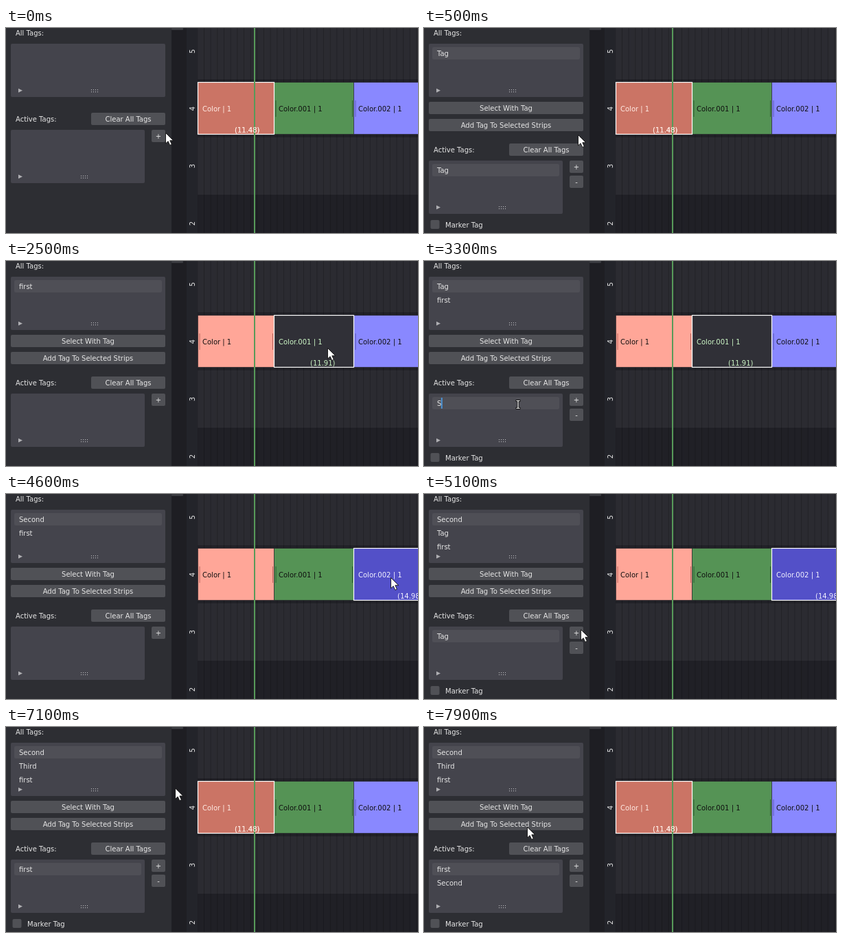
An HTML page that plays this animation: 600x300 px, repeating every 8000 ms.

```html
<!DOCTYPE html>
<html lang="en">
<head>
<meta charset="utf-8">
<title>Strip tags</title>
<style>
  html, body { margin: 0; width: 100%; height: 100%; overflow: hidden; background: #2d2e33; }
  svg { display: block; width: 600px; height: 300px; }
  text { font: 10px "DejaVu Sans", sans-serif; fill: #e6e6e6; white-space: pre; }
  .mid { text-anchor: middle; }
  .list { fill: #44444c; }
  .row { fill: #4f4f56; }
  .button { fill: #505156; }
  .hot { fill: #5d5e63; }
  .grip, .fold { fill: #c9c9cc; }
  .fold { opacity: .8; }
</style>
</head>
<body>
<svg viewBox="0 0 600 300">
  <defs>
    <pattern id="grid" x="288" width="9.67" height="300" patternUnits="userSpaceOnUse">
      <path d="M.5 0V300" stroke="#000" stroke-opacity=".22"/>
    </pattern>
  </defs>
  <rect width="600" height="300" fill="#2d2e33"/>
  <rect x="241" width="22" height="300" fill="#1e1e23"/>
  <rect x="241" width="17" height="3" rx="1" fill="#3a3b40"/>
  <rect x="263" width="337" height="300" fill="#2b2b31"/>
  <rect x="263" y="75" width="337" height="85" fill="#212127"/>
  <rect x="263" y="244" width="337" height="56" fill="#202026"/>
  <rect x="279" width="321" height="300" fill="url(#grid)"/>
  <rect x="263" width="16" height="300" fill="#23242a"/>
  <g id="channels"></g>
  <g id="strips"></g>
  <g id="panel"></g>
  <g id="arrow">
    <path d="M.5 .5V16l3.6-3.3 2.6 5.8 2.7-1.2-2.6-5.6h4.9z" fill="#fff" stroke="#111" stroke-width=".9"/>
  </g>
  <g id="beam" fill="none" stroke-linecap="square">
    <path d="M-2-5.5h4M0-5.5v11M-2 5.5h4" stroke="#111" stroke-width="3"/>
    <path d="M-2-5.5h4M0-5.5v11M-2 5.5h4" stroke="#fff" stroke-width="1.2"/>
  </g>
</svg>
<script>
const LOOP = 8000, STEP = 100;
const $ = id => document.getElementById(id);

const strips = [
  { x: 279.5, w: 111, name: "Color | 1", nameX: 286, time: "(11.48)", timeX: 333,
    fill: "#ffa698", on: "#cb7465", ink: "#ffeae3", edge: "#b8645c" },
  { x: 390.5, w: 116, name: "Color.001 | 1", nameX: 397, time: "(11.91)", timeX: 443,
    fill: "#559355", on: "#303037", ink: "#cdf7c6", edge: "#2f5c33" },
  { x: 506.5, w: 120, name: "Color.002 | 1", nameX: 513, time: "(14.98)", timeX: 570,
    fill: "#8988ff", on: "#5350c8", ink: "#f3f2ff", edge: "#5c5ab5" }
];

// Each entry changes part of the state from its time on.
const events = [
  [0, { all: [], active: [], sel: 0, edit: null, marked: false, hot: "" }],
  [400, { hot: "+" }],
  [500, { all: ["Tag"], active: ["Tag"], hot: "" }],
  [1200, { edit: "Tag", marked: true }],
  ...typed("first", 1300),
  [1900, { edit: null, all: ["first"], active: ["first"] }],
  [2500, { sel: 1, active: [] }],
  [2900, { hot: "+" }],
  [3000, { all: ["Tag", "first"], active: ["Tag"], hot: "" }],
  [3200, { edit: "Tag", marked: true }],
  [3300, { edit: "S", marked: false }],
  [3800, { edit: "Sec" }],
  [3900, { edit: "Secon" }],
  [4100, { edit: "Second" }],
  [4200, { edit: null, all: ["Second", "first"], active: ["Second"] }],
  [4600, { sel: 2, active: [] }],
  [5000, { all: ["Second", "Tag", "first"], active: ["Tag"] }],
  [5700, { edit: "Tag", marked: true }],
  [5800, { edit: "T", marked: false }],
  [5900, { edit: "Th" }],
  [6100, { edit: "Third" }],
  [6300, { edit: null, all: ["Second", "Third", "first"], active: ["Third"] }],
  [6800, { sel: 0, active: ["first"] }],
  [7800, { hot: "add" }],
  [7900, { active: ["first", "Second"], hot: "" }]
];

// Pointer stops: time, x, y
const path = [
  [0, 232, 153], [200, 232, 153], [300, 224, 156], [500, 224, 156], [1000, 76, 203],
  [1900, 76, 203], [2300, 468, 127], [2500, 468, 127], [2900, 223, 199], [3000, 223, 199],
  [3200, 137, 210], [4200, 137, 210], [4600, 560, 122], [4900, 228, 198], [5100, 228, 198],
  [5500, 110, 208], [6300, 110, 208], [6500, 267, 177], [6800, 320, 116], [6900, 320, 116],
  [7400, 110, 40], [7600, 110, 40], [7800, 150, 146], [8000, 150, 146]
];
const beamTimes = [[900, 1900], [3200, 4200], [5500, 6300]];

function typed(word, start) {
  return [...word].map((c, i) => [start + i * STEP, { edit: word.slice(0, i + 1), marked: false }]);
}

// y is the middle of the line
const label = (s, x, y, attrs = "") => `<text x="${x}" y="${y + 3.8}" ${attrs}>${s}</text>`;
const box = (x, y, w, h, cls) => `<rect x="${x}" y="${y}" width="${w}" height="${h}" rx="2" class="${cls}"/>`;
const button = (s, x, y, w, hot) =>
  box(x, y, w, 18, hot ? "hot" : "button") + label(s, x + w / 2, y + 9.2, 'class="mid"');

function list(y, w, items) {
  let out = box(7, y, w, 78, "list");
  if (items.length) out += box(12, y + 5, w - 10, 18, "row");
  items.forEach((s, i) => out += label(s, 19, y + 14 + i * 20));
  out += `<path class="fold" d="M18 ${y + 65.5}l6 3-6 3z"/>`;
  const mid = 7 + Math.round(w / 2);
  for (let i = 0; i < 8; i++)
    out += `<rect class="grip" x="${mid + 4 + (i % 4) * 3}" y="${y + 67 + (i >> 2) * 3}" width="1" height="1"/>`;
  return out;
}

const ruler = document.createElement("canvas").getContext("2d");
ruler.font = '10px "DejaVu Sans", sans-serif';

function field(s, marked, y) {
  const w = ruler.measureText(s).width;
  return box(12, y + 5, 185, 18, "row") +
    (marked ? `<rect x="19" y="${y + 6}" width="${w}" height="16" fill="#2e3036"/>` : "") +
    label(s, 19, y + 14) +
    `<rect x="${18.5 + w}" y="${y + 6}" width="2" height="16" fill="#4a91d2"/>`;
}

function panel(s) {
  const dy = s.all.length ? 45 : 0, y = 149 + dy;
  const editing = s.edit !== null;
  let out = label("All Tags:", 14, 7) + list(23, 225, s.all);
  if (dy) {
    out += button("Select With Tag", 7, 108, 225);
    out += button("Add Tag To Selected Strips", 7, 133, 225, s.hot === "add");
  }
  out += label("Active Tags:", 14, 133 + dy) + button("Clear All Tags", 124, 124 + dy, 108);
  out += list(y, 195, editing ? [] : s.active);
  if (editing) out += field(s.edit, s.marked, y);
  out += button("+", 212, y, 20, s.hot === "+");
  if (s.active.length) {
    out += button("-", 212, y + 22, 20);
    out += box(9.5, y + 87, 13, 13, "button") + label("Marker Tag", 31, y + 94);
  }
  return out;
}

function strip(s, on) {
  const ink = on ? s.ink : "#101010";
  let out = `<rect x="${s.x}" y="79.5" width="${s.w}" height="76" fill="${on ? s.on : s.fill}" stroke="${on ? "#fff" : "#25252b"}" stroke-width="${on ? 1.2 : .6}"/>`;
  if (!on) out += `<path d="M${s.x + 2.5} 106v24M${s.x + s.w - 2} 106v24" stroke="${s.edge}"/>`;
  out += label(s.name, s.nameX, 118, `style="fill:${ink}"`);
  if (on) out += label(s.time, s.timeX, 149.5, `style="fill:${ink}"`);
  return out;
}

function stripRow(sel) {
  // the selected strip goes last so its outline stays on top
  const order = strips.map((s, i) => i).sort((a, b) => (a === sel) - (b === sel));
  return order.map(i => strip(strips[i], i === sel)).join("") +
    '<rect x="361" width="2" height="300" fill="#579a59"/>' +
    (sel === 0 ? label(strips[0].time, strips[0].timeX, 149.5, `style="fill:${strips[0].ink}"`) : "");
}

function pointer(t) {
  const i = path.findIndex(p => p[0] > t);
  const [t0, x0, y0] = path[i - 1], [t1, x1, y1] = path[i];
  const k = (t - t0) / (t1 - t0), e = k * k * (3 - 2 * k);
  const isBeam = beamTimes.some(([a, b]) => t >= a && t < b);
  const at = `translate(${x0 + (x1 - x0) * e} ${y0 + (y1 - y0) * e})`;
  for (const [id, show] of [["arrow", !isBeam], ["beam", isBeam]]) {
    $(id).setAttribute("transform", at);
    $(id).style.display = show ? "" : "none";
  }
}

function draw(t) {
  const s = Object.assign({}, ...events.filter(e => e[0] <= t).map(e => e[1]));
  $("panel").innerHTML = panel(s);
  $("strips").innerHTML = stripRow(s.sel);
  pointer(t);
}

$("channels").innerHTML = [5, 4, 3, 2].map((n, i) =>
  `<text class="mid" transform="translate(274.5 ${34 + i * 84}) rotate(-90)">${n}</text>`).join("");

const start = performance.now();
let shown = -1;
function tick() {
  const t = Math.floor((performance.now() - start) % LOOP / STEP) * STEP;
  if (t !== shown) draw(shown = t);
  requestAnimationFrame(tick);
}
tick();
</script>
</body>
</html>
```
